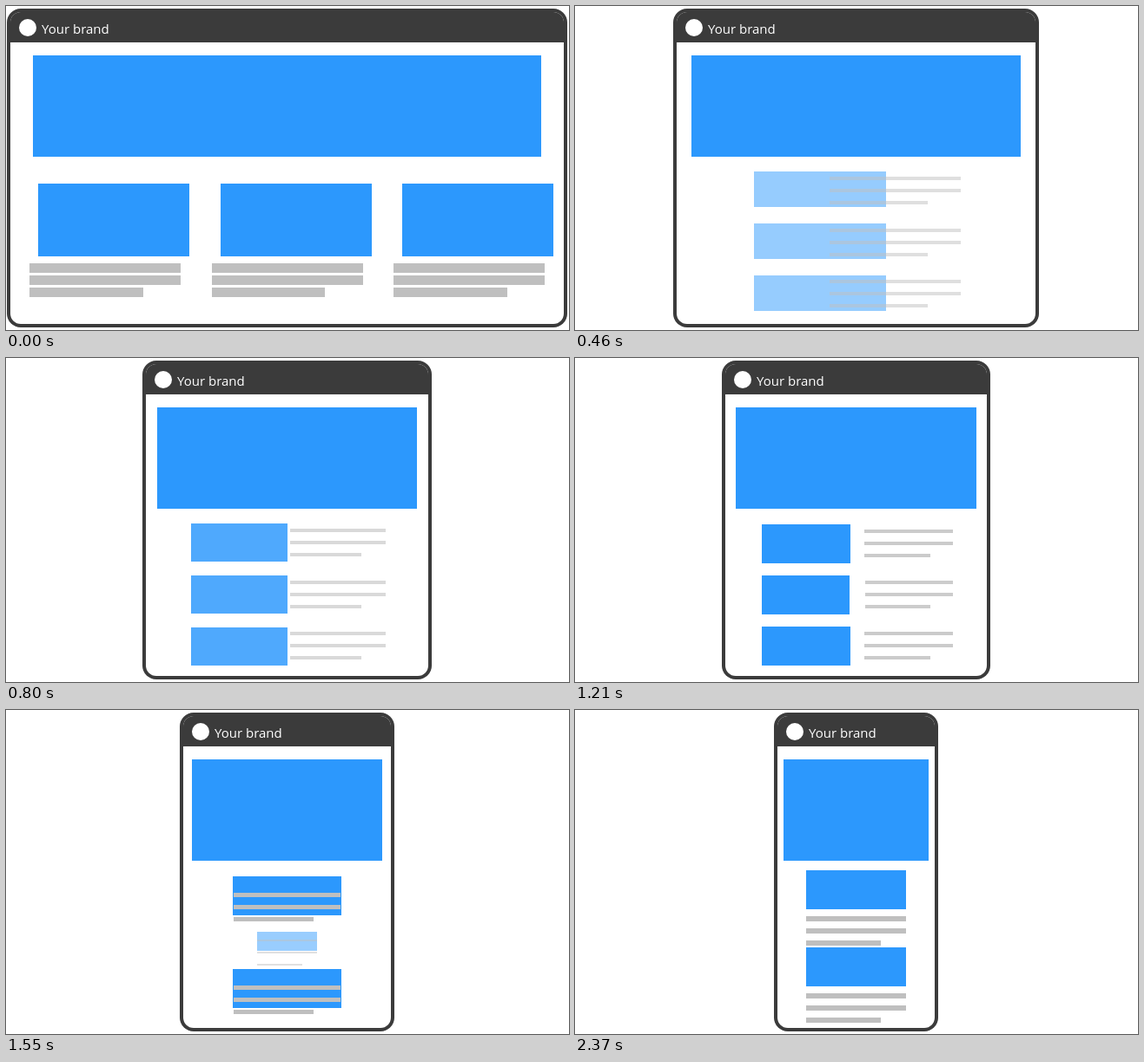
Write an HTML page with a canvas that moves like this. It is 648 by 374 pixels and loops after 2.41 s.

```html
<!DOCTYPE html>
<html lang="en">
<head>
<meta charset="utf-8">
<title>Responsive layout</title>
<style>
  html, body { margin: 0; width: 100%; height: 100%; overflow: hidden; background: #fff; }
  canvas { display: block; }
</style>
</head>
<body>
<canvas id="stage" width="648" height="374"></canvas>
<script>
const ctx = document.getElementById('stage').getContext('2d');
const LOOP = 2410, CENTER = 323.5;
const DARK = '#3b3b3b', BLUE = '#2c98fd', GRAY = '#bfbfbf';

const lerp = (a, b, p) => a + (b - a) * p;
const clamp = v => Math.min(1, Math.max(0, v));

// cubic-bezier(.25, .1, .25, 1)
function ease(x) {
  let lo = 0, hi = 1;
  for (let i = 0; i < 24; i++) {
    const s = (lo + hi) / 2;
    if (0.75 * s * (1 - s) + s ** 3 < x) lo = s; else hi = s;
  }
  const s = hi, r = 1 - s;
  return 0.3 * s * r * r + 3 * s * s * r + s ** 3;
}

// Piecewise linear curve through [position, value] points.
function track(p, points) {
  let i = 1;
  while (i < points.length - 1 && p > points[i][0]) i++;
  const [p0, v0] = points[i - 1], [p1, v1] = points[i];
  return lerp(v0, v1, clamp((p - p0) / (p1 - p0)));
}

function box(x, y, w, h, color, alpha = 1) {
  const left = Math.round(x), top = Math.round(y);
  ctx.globalAlpha = clamp(alpha);
  ctx.fillStyle = color;
  ctx.fillRect(left, top, Math.round(x + w) - left, Math.round(h));
  ctx.globalAlpha = 1;
}

function card(pic, bars) {
  box(pic.x, pic.y, pic.w, pic.h, BLUE, pic.alpha);
  for (let i = 0; i < 3; i++) {
    box(bars.x, bars.y + 14 * i, bars.w * (i < 2 ? 1 : 0.75), bars.h, GRAY, bars.alpha);
  }
}

function panel(left) {
  const inner = 639 - 2 * left;
  const rounded = (x, y, w, h, r) => {
    ctx.beginPath();
    ctx.roundRect(x, y, w, h, r);
  };
  rounded(left, 3, inner + 8, 368, 16);
  ctx.fillStyle = DARK;
  ctx.fill();
  rounded(left + 4, 7, inner, 360, 12);
  ctx.fillStyle = '#fff';
  ctx.fill();
  rounded(left + 4, 7, inner, 35, [12, 12, 0, 0]);
  ctx.fillStyle = DARK;
  ctx.fill();

  ctx.fillStyle = '#fff';
  ctx.beginPath();
  ctx.arc(left + 24, 25, 10, 0, Math.PI * 2);
  ctx.fill();
  ctx.font = '15px "Open Sans", "Noto Sans", sans-serif';
  ctx.fillText('Your brand', left + 40, 32);

  const hero = inner * 0.918;
  box(CENTER - hero / 2, 57, hero, 117, BLUE);
}

function columns(p, left) {
  const inner = 639 - 2 * left;
  const w = inner * 0.2735 * (1 - 0.5 * p);
  const alpha = 1 - 1.5 * p;
  const shift = 10 * inner / 637;
  for (let i = 0; i < 3; i++) {
    const x = left + 4 + inner * (0.0345 + 0.329 * i);
    card(
      { x: x + shift, y: lerp(205, 192, p), w, h: lerp(84, 45, p), alpha },
      { x, y: lerp(297, 240, p), w, h: lerp(11, 4, p), alpha }
    );
  }
}

// Picture at the left and bars at the right of a shared, narrowing row.
function rowsIn(p) {
  const row = lerp(272, 220, p);
  const w = row * (1 - 0.542 * p), barW = row * (1 - 0.546 * p);
  const alpha = track(p, [[0.5, 0.25], [0.671, 0.5], [0.93, 0.83], [1, 1]]);
  const barAlpha = track(p, [[0.5, 0.25], [0.671, 0.5], [0.93, 0.58], [1, 0.8]]);
  const settle = track(p, [[0.95, 0], [1, 1]]);
  for (let i = 0; i < 3; i++) {
    card(
      { x: 325 - row / 2, y: 191 + 60 * i + settle * (1 - i), w, h: lerp(33, 45, p), alpha },
      { x: 325 + row / 2 - barW, y: 197 + 59.7 * i + settle * (1 - i / 2), w: barW, h: 4, alpha: barAlpha }
    );
  }
}

function rowsOut(p) {
  const row = lerp(220, 115, p);
  const center = lerp(325, CENTER, p);
  const share = lerp(0.46, 1, p);
  for (let i = 0; i < 3; i++) {
    const mid = i === 1;
    const w = row * share * (mid ? 1 - 0.9 * p : 1);
    const shrink = mid ? 1 - p : 1;
    const y = 192 + 59 * i - (i === 2 ? 22 * p : 0) + (mid ? 10 * p : 0);
    card(
      { x: center - row / 2, y, w, h: 45 * shrink, alpha: shrink },
      { x: center + row / 2 - w, y: y + 6, w, h: mid ? 4 * shrink : lerp(4, 6, p), alpha: lerp(0.8, 1, p) * shrink }
    );
  }
}

function stack(p) {
  const at = (a, b, c) => track(p, [[0.513, a], [0.888, b], [1, c]]);
  const w = at(125, 121, 115), barW = at(123, 121, 115);
  const offset = at(19, 43, 53);
  const outer = y => card(
    { x: CENTER - w / 2, y, w, h: 44.6, alpha: 1 },
    { x: CENTER - barW / 2, y: y + offset, w: barW, h: at(5, 6, 6), alpha: 1 }
  );
  outer(at(192, 187, 185));
  if (p < 0.99) {
    const midW = at(69, 20, 0), x = 323.5 - midW / 2 + at(0, 2, 2), y = at(256, 253, 252);
    card(
      { x, y, w: midW, h: at(22, 4, 0), alpha: 1 - p },
      { x, y: y + at(9, 10, 10), w: midW, h: at(2, 1, 0), alpha: 1 - p }
    );
  }
  outer(at(299, 281, 274));
}

function draw(t) {
  const first = ease(clamp(t / 1180));
  const second = ease(clamp((t - 1200) / 1165));
  const left = Math.round(1 + 168 * first + 60 * second);
  ctx.fillStyle = '#fff';
  ctx.fillRect(0, 0, 648, 374);
  panel(left);
  if (t < 1200) {
    if (first < 0.5) columns(first, left); else rowsIn(first);
  } else {
    if (second < 0.5) rowsOut(second); else stack(second);
  }
}

const start = performance.now();
function tick() {
  draw((performance.now() - start) % LOOP);
  requestAnimationFrame(tick);
}
tick();
</script>
</body>
</html>
```
